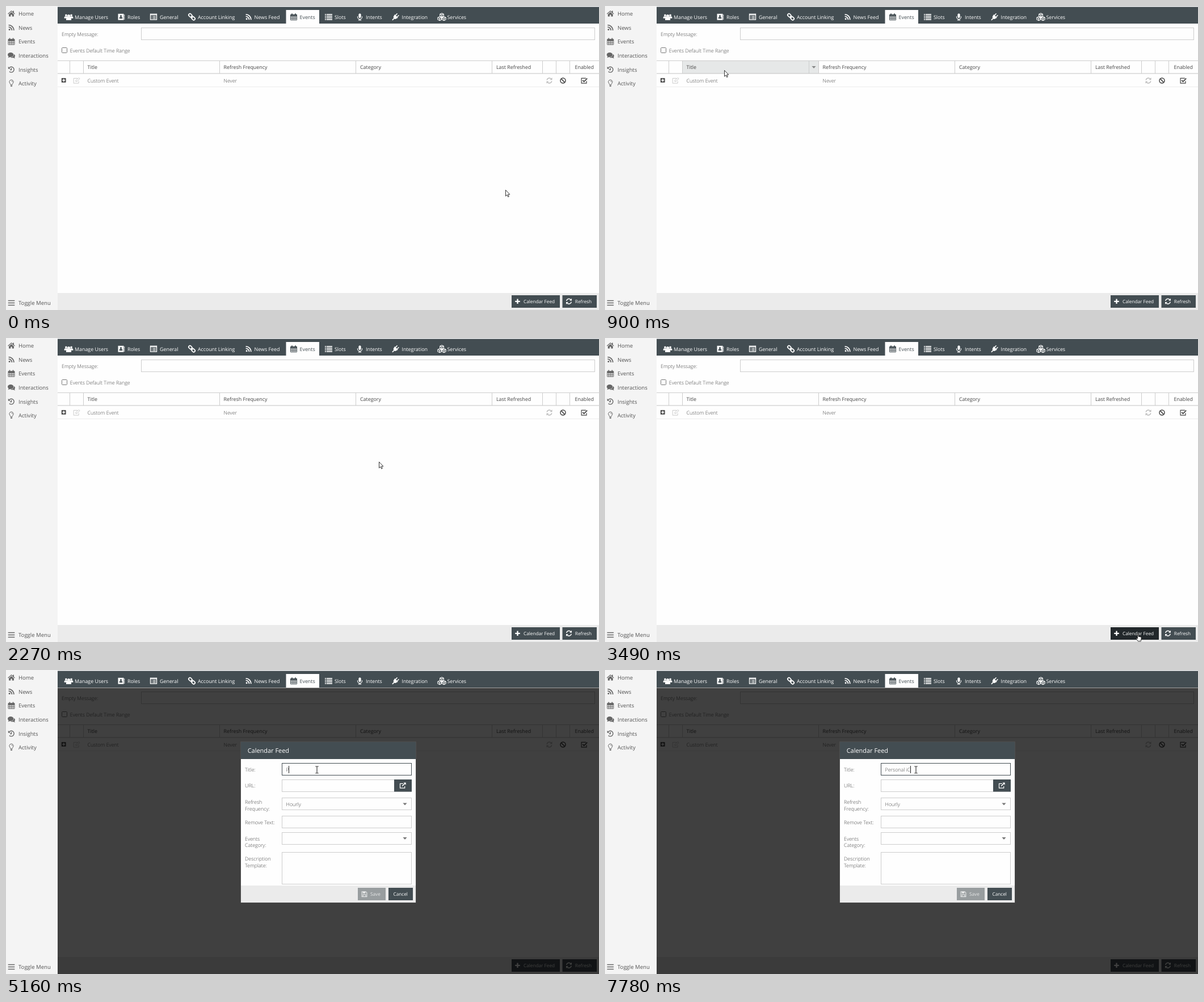
An HTML page for the animation above (8000 ms loop, 1045 by 536 pixels).

```html
<!DOCTYPE html>
<html lang="en">
<head>
<meta charset="utf-8">
<title>Calendar feed settings</title>
<style>
html, body { margin: 0; width: 100%; height: 100%; overflow: hidden; background: #fefefe; }
svg { display: block; width: 100vw; height: 100vh; }
text { font-family: "Open Sans", "Noto Sans", sans-serif; text-rendering: geometricPrecision; }
.light { font-weight: 300; }
.line { fill: none; stroke: currentColor; }
</style>
</head>
<body>
<svg id="stage" viewBox="0 0 1045 536" xmlns="http://www.w3.org/2000/svg"></svg>
<script>
const DARK = '#434d52', PAGE = '#fefefe', FOOT = '#ebebeb', EDGE = '#cdcdcd', INK = '#444';
const LOOP = 8000;

// Shapes; text is placed by the middle of its capitals.
const rect = (x, y, w, h, fill, more = '') =>
  `<rect x="${x}" y="${y}" width="${w}" height="${h}" fill="${fill}" ${more}/>`;
const box = (x, y, w, h, stroke = EDGE, more = '') =>
  rect(x + .5, y + .5, w - 1, h - 1, PAGE, `stroke="${stroke}" ${more}`);
const text = (x, mid, str, size = 8.9, fill = INK, cls = '') =>
  `<text x="${x}" y="${mid + size * .36}" font-size="${size}" fill="${fill}" class="${cls}">${str}</text>`;
const light = (x, mid, str) => text(x, mid, str, 8.9, INK, 'light');
const path = (d, more = '') => `<path d="${d}" ${more}/>`;
const line = (d, width = 1) => path(d, `class="line" stroke-width="${width}"`);
const group = (id, inner, more = '') => `<g id="${id}" ${more}>${inner}</g>`;
const person = (x, y, s) =>
  `<g transform="translate(${x} ${y}) scale(${s})"><circle cy="-2.6" r="2.5"/>` +
  path('M-4.5 5V3Q-4.5 0-2 0H2Q4.5 0 4.5 3V5Z') + '</g>';
const cube = (x, y) =>
  line(`M${x} ${y - 3.4}l3.3 1.5v3.6l-3.3 1.7-3.3-1.7v-3.6zm-3.3 1.5l3.3 1.5 3.3-1.5m-3.3 1.5v3.6`, 1.1);

// Icons are drawn around 0,0.
const ICONS = {
  home: path('M-6.3 .2 0-5.5 2.6-3.1V-4.8H4.4V-1.5L6.3 .2 5.5 1.1 0-3.8-5.5 1.1Z') +
    path('M-4.4 1.3 0-2.6 4.4 1.3V5.2H1.2V2H-1.2V5.2H-4.4Z'),
  rss: '<circle cx="-3.4" cy="3.6" r="1.5"/>' +
    line('M-4.9-.9A5.9 5.9 0 0 1 1 5M-4.9-4.3A9.3 9.3 0 0 1 4.4 5', 1.8),
  calendar: line('M-5.5-4H5.5V5.5H-5.5ZM-5.5-1H5.5M-5.5 2.2H5.5M-2.8-1V5.5M0-1V5.5M2.8-1V5.5', 1) +
    path('M-5.5-4H5.5V-1.5H-5.5Z') + line('M-3-6V-2.8M3-6V-2.8', 1.8),
  chat: '<ellipse cx="-1.3" cy="-1.2" rx="5.2" ry="3.9"/>' + path('M-4.5 1-5.8 4-1 2.3Z') +
    path('M4.6-2.4Q8 .5 5.4 3L6.6 5.2 3.4 4Q0 4.5-1.8 3.5 4.5 3 4.6-2.4Z'),
  history: line('M-3.6-3.1A4.8 4.8 0 1 1-3.6 3.6M0-2.6V.7H-2.4', 1.4) + path('M-5.7-5V-1H-1.7Z'),
  bulb: line('M-1.4 2.5Q-1.4 1.2-2.7-.2A3.6 3.6 0 1 1 2.7-.2Q1.4 1.2 1.4 2.5ZM.2-4.1Q1.7-3.9 1.8-2.5', 1) +
    line('M-1.7 3.8H1.7M-1.4 5.2H1.4', 1),
  bars: line('M-5.8-4H5.8M-5.8 0H5.8M-5.8 4H5.8', 1.6),
  users: person(-4.6, -1, .72) + person(4.6, -1, .72) + person(0, .8, 1),
  book: path('M-5.5-5.5H4.5V5.5H-5.5ZM5.2-4H6.2V-1.5H5.2ZM5.2-.8H6.2V1.6H5.2ZM5.2 2.3H6.2V4.6H5.2Z') +
    `<g fill="${DARK}">${person(-.5, 0, .62)}</g>`,
  form: line('M-5.5-5H5.5V5H-5.5ZM-5.5-3.6H5.5', 1.3) + line('M-3.6-1H-2.4M-1.2-1H3.8M-3.6 1H-2.4M-1.2 1H3.8M-3.6 3H-2.4M-1.2 3H3.8', 1.1),
  link: '<g transform="rotate(45)"><rect x="-7" y="-2.3" width="7" height="4.6" rx="2.2" class="line" stroke-width="1.7"/>' +
    '<rect x="0" y="-2.3" width="7" height="4.6" rx="2.2" class="line" stroke-width="1.7"/>' + line('M-2.5 0H2.5', 1.4) + '</g>',
  list: line('M-6.5-4.4H-4.7M-3.7-4.4H6.5M-6.5-1.4H-4.7M-3.7-1.4H6.5M-6.5 1.6H-4.7M-3.7 1.6H6.5M-6.5 4.6H-4.7M-3.7 4.6H6.5', 1.8),
  mic: '<rect x="-2.1" y="-6" width="4.2" height="8" rx="2.1"/>' + line('M-4-1V0A4 4 0 0 0 4 0V-1M0 4V5.7M-2.6 5.7H2.6', 1.1),
  plug: '<g transform="rotate(45)">' + path('M-4-2H4V-.6H3.4Q3.4 3.4 .8 3.8V8H-.8V3.8Q-3.4 3.4-3.4-.6H-4Z') +
    line('M-2-6.3V-2M2-6.3V-2', 1.5) + '</g>',
  cubes: cube(0, -3) + cube(-3.8, 3) + cube(3.8, 3),
  refresh: line('M-4.3-.8A4.3 4.3 0 0 1 3-3.2M4.3 .8A4.3 4.3 0 0 1-3 3.2', 1.5) + path('M5-5.2V-1.2H1ZM-5 5.2V1.2H-1Z'),
  ban: '<circle r="4.5" class="line" stroke-width="1.5"/>' + line('M-3.1-3.1 3.1 3.1', 1.5),
  check: line('M4 .8V4.6H-4.9V-4.2H3', 1.2) + line('M-2.8-.7-.4 1.8 5.2-3.8', 1.8),
  edit: line('M3.6 1V4.7H-5.3V-4H1.5', 1) + line('M-1.6 1.6-1.3-.6 4-5 5.6-3.4.5 1.5Z', 1),
  expand: '<rect x="-4" y="-4" width="8" height="8" rx="1"/>' + `<g color="${PAGE}">${line('M-2.4 0H2.4M0-2.4V2.4', 1.5)}</g>`,
  plus: line('M-4.3 0H4.3M0-4.3V4.3', 2.3),
  open: line('M3.2 1V4.4H-5V-3.4H.4', 1.2) + line('M-1.5 1 4-4.2', 1.5) + path('M1-5.2H5.2V-1Z'),
  save: line('M-4.4-4.4H2.5L4.4-2.5V4.4H-4.4ZM-2.4 4.2V.9H2.4V4.2', 1.1) + path('M-2.8-4.4H1.8V-1.3H-2.8Z'),
  caret: path('M-3.6-1.9H3.6L0 1.9Z')
};
const icon = (name, x, y, color = '#666') =>
  `<g transform="translate(${x} ${y})" color="${color}" fill="${color}">${ICONS[name]}</g>`;

const MENU = [['home', 'Home'], ['rss', 'News'], ['calendar', 'Events'], ['chat', 'Interactions'],
  ['history', 'Insights'], ['bulb', 'Activity']];
const TABS = [['users', 110.5, 121, 'Manage Users'], ['book', 203, 214, 'Roles'], ['form', 260, 271, 'General'],
  ['link', 327.5, 338, 'Account Linking'], ['rss', 427.5, 437.5, 'News Feed'], ['calendar', 507, 517.5, 'Events'],
  ['list', 568.5, 579, 'Slots'], ['mic', 623.5, 634, 'Intents'], ['plug', 686.5, 697.5, 'Integration'],
  ['cubes', 768, 777.5, 'Services']];
const HEADS = [[143.5, 'Title'], [383.5, 'Refresh Frequency'], [624, 'Category'], [864, 'Last Refreshed'], [1002.5, 'Enabled']];
const COLUMNS = [112, 136, 376, 616, 856, 945, 969, 993];

function sidebar() {
  const item = (name, label, y) => icon(name, 9.5, y, '#666') + text(22, y + .3, label, 9.55, '#555');
  return rect(0, 0, 91, 536, '#f4f4f4') +
    MENU.map(([name, label], i) => item(name, label, 13.4 + i * 24.6)).join('') +
    item('bars', 'Toggle Menu', 523.5);
}

function tabBar() {
  return rect(91, 1.5, 954, 29.5, DARK) + rect(493.5, 7, 58.5, 24.5, PAGE) +
    TABS.map(([name, ix, tx, label]) => {
      const color = label === 'Events' ? DARK : '#fff';
      return icon(name, ix, 19.2, color) + text(tx, 19.6, label, 8.9, color);
    }).join('');
}

function page() {
  return light(98, 49.4, 'Empty Message:') + box(238, 38, 800, 22) +
    box(98, 73, 10, 10, '#777', 'rx="1"') + light(112.8, 78.3, 'Events Default Time Range') +
    group('rowHover', rect(91, 119, 954, 23, '#f0f1f1')) +
    group('headHover', rect(137, 97, 239, 22, '#e6e8e8') + rect(359, 97, 1, 22, EDGE) + icon('caret', 368, 108, '#888')) +
    rect(91, 96, 954, 1, EDGE) + rect(91, 118.5, 954, 1, '#c4c4c4') + rect(91, 142, 954, 1, '#ececec') +
    COLUMNS.map(x => rect(x, 97, 1, 22, EDGE)).join('') +
    HEADS.map(([x, label]) => text(x, 107.8, label)).join('') +
    icon('expand', 101.7, 131, '#555') + icon('edit', 124.5, 131.5, '#ccc') +
    light(143.5, 131.8, 'Custom Event') + light(383.5, 131.8, 'Never') +
    icon('refresh', 957.5, 131.5, '#bbb') + icon('ban', 981.5, 131.5, '#444') + icon('check', 1019, 131.5, '#444') +
    rect(91, 506, 954, 30, FOOT) +
    rect(891, 510, 85, 22, DARK, 'id="feedButton"') + icon('plus', 901.5, 520.8, '#fff') +
    text(912, 521, 'Calendar Feed', 8.23, '#fff') +
    rect(980.5, 510, 60.5, 22, DARK) + icon('refresh', 992, 520.8, '#fff') + text(1002.8, 521, 'Refresh', 8.23, '#fff');
}

function dialog() {
  const labels = [[175.4, 'Title:'], [204, 'URL:'], [233, 'Refresh'], [244.5, 'Frequency:'], [268.5, 'Remove Text:'],
    [297.3, 'Events'], [309, 'Category:'], [332.8, 'Description'], [344.5, 'Template:']];
  const fields = [[193, 22], [225, 22], [257, 22], [286, 22], [321, 57]];
  return rect(91, 31.5, 954, 504.5, '#000', 'opacity=".75"') +
    rect(413, 126, 310, 285, '#555', 'opacity=".7" rx="1"') +
    rect(414, 127, 308, 283, PAGE) + rect(414, 127, 308, 30, DARK) +
    text(425.7, 142.3, 'Calendar Feed', 10.95, '#fff') +
    labels.map(([y, label]) => light(421, y, label)).join('') +
    box(486, 164, 229, 22, EDGE, 'id="titleBox"') +
    fields.map(([y, h]) => box(486, y, 229, h)).join('') +
    rect(684, 193, 31, 21.5, DARK) + icon('open', 699.5, 203.8, '#fff') +
    light(493.5, 237, 'Hourly') + icon('caret', 703, 236.5, '#777') + icon('caret', 703, 297, '#777') +
    rect(414, 380, 308, 30, FOOT) +
    rect(620, 384, 49, 22, DARK, 'id="saveButton"') +
    group('saveFace', icon('save', 631.5, 395.2, '#fff') + text(642, 395.3, 'Save', 8.23, '#fff')) +
    rect(674, 384, 43, 22, DARK) + text(682.5, 395.3, 'Cancel', 8.23, '#fff') +
    '<text id="typed" x="493.5" y="178.9" font-size="8.9" class="light" fill="#444"></text>' +
    rect(493, 169, 1, 13, '#222', 'id="caret"');
}

const pointers =
  group('arrow', path('M.5 .5V11.2L3 8.9 4.6 12.6 6.3 11.9 4.7 8.2H7.8Z', 'fill="#fff" stroke="#111" stroke-width=".85"')) +
  group('hand', path('M2.4 1.3Q3.2 .3 4 1.3V5.2L8.2 6.1Q9.4 6.5 9.2 8L8.3 13.5H3.2L.4 9.4Q0 8.2 1.2 8.2L2.4 9.2Z',
    'fill="#fff" stroke="#111" stroke-width=".85"')) +
  group('beam', line('M-2.6-5.7H-.7L0-5.1.7-5.7H2.6M0-5V5.5M-2.6 6.2H-.7L0 5.6.7 6.2H2.6', 1), 'color="#111"');

const stage = document.getElementById('stage');
stage.innerHTML = rect(0, 0, 1045, 536, PAGE) + sidebar() + tabBar() + page() + group('dialog', dialog()) + pointers;
const $ = id => document.getElementById(id);
const show = (id, on) => $(id).setAttribute('display', on ? 'inline' : 'none');

// Pointer stops: tick, x, y.
const STOPS = [[0, 880, 324], [3, 560, 215], [5, 250, 124], [6, 210, 113], [7, 204, 75], [9, 200, 58],
  [12, 212, 104], [14, 225, 115], [15, 657, 218], [16, 657, 218], [17, 690, 330], [18, 790, 527], [19, 833, 455],
  [20, 833, 455], [21, 905, 500], [22, 934, 517], [23, 936, 521], [24, 915.5, 507.5], [25, 790, 400],
  [26, 660, 280], [27, 556, 186], [28, 550, 179], [29, 548, 175.7]];
const EDITS = [[4400, ''], [5160, 'P'], [5310, 'Pe'], [5460, 'Pers'], [5620, 'Perso'], [5770, 'Person'],
  [6080, 'Personal'], [6250, 'Personal '], [7010, 'Personal ic'], [7480, 'Personal i'], [7780, 'Personal iC']];

// The screen refreshes in ticks of about 152 ms.
const tickAt = t => Math.floor((t + 12) / 151.6);

function pointerAt(tick) {
  const i = STOPS.findIndex(s => s[0] >= tick);
  if (i < 0) return STOPS[STOPS.length - 1].slice(1);
  if (i === 0) return STOPS[0].slice(1);
  const [a, ax, ay] = STOPS[i - 1], [b, bx, by] = STOPS[i];
  const k = (tick - a) / (b - a);
  return [ax + (bx - ax) * k, ay + (by - ay) * k];
}

function draw(t) {
  const tick = tickAt(t), [x, y] = pointerAt(tick);
  const open = tick >= 24, focus = t >= 4390;
  const onButton = !open && x > 891 && x < 976 && y > 510 && y < 532;
  const kind = onButton ? 'hand' : tick >= 27 ? 'beam' : 'arrow';
  for (const id of ['arrow', 'hand', 'beam']) show(id, id === kind);
  $(kind).setAttribute('transform', `translate(${x} ${y})`);

  show('headHover', !open && x > 137 && x < 376 && y > 96 && y < 119);
  show('rowHover', !open && y >= 119 && y < 142);
  $('feedButton').setAttribute('fill', onButton ? '#22282b' : DARK);
  show('dialog', open);
  $('titleBox').setAttribute('stroke', focus ? DARK : EDGE);

  const [since, value] = EDITS.filter(e => e[0] <= t).pop() || [LOOP, ''];
  const typed = $('typed');
  typed.textContent = value.replace(/ /g, '\u00a0');
  $('saveButton').setAttribute('fill', value ? '#989d9f' : DARK);
  $('saveFace').setAttribute('opacity', value ? .75 : 1);
  show('caret', t >= since && t - since < 458);
  if (open) $('caret').setAttribute('x', Math.round(493.2 + (value ? typed.getComputedTextLength() : 0)));
}

const start = performance.now();
function loop(now) {
  draw(Math.max(0, now - start) % LOOP);
  requestAnimationFrame(loop);
}
draw(0);
requestAnimationFrame(loop);
</script>
</body>
</html>
```
